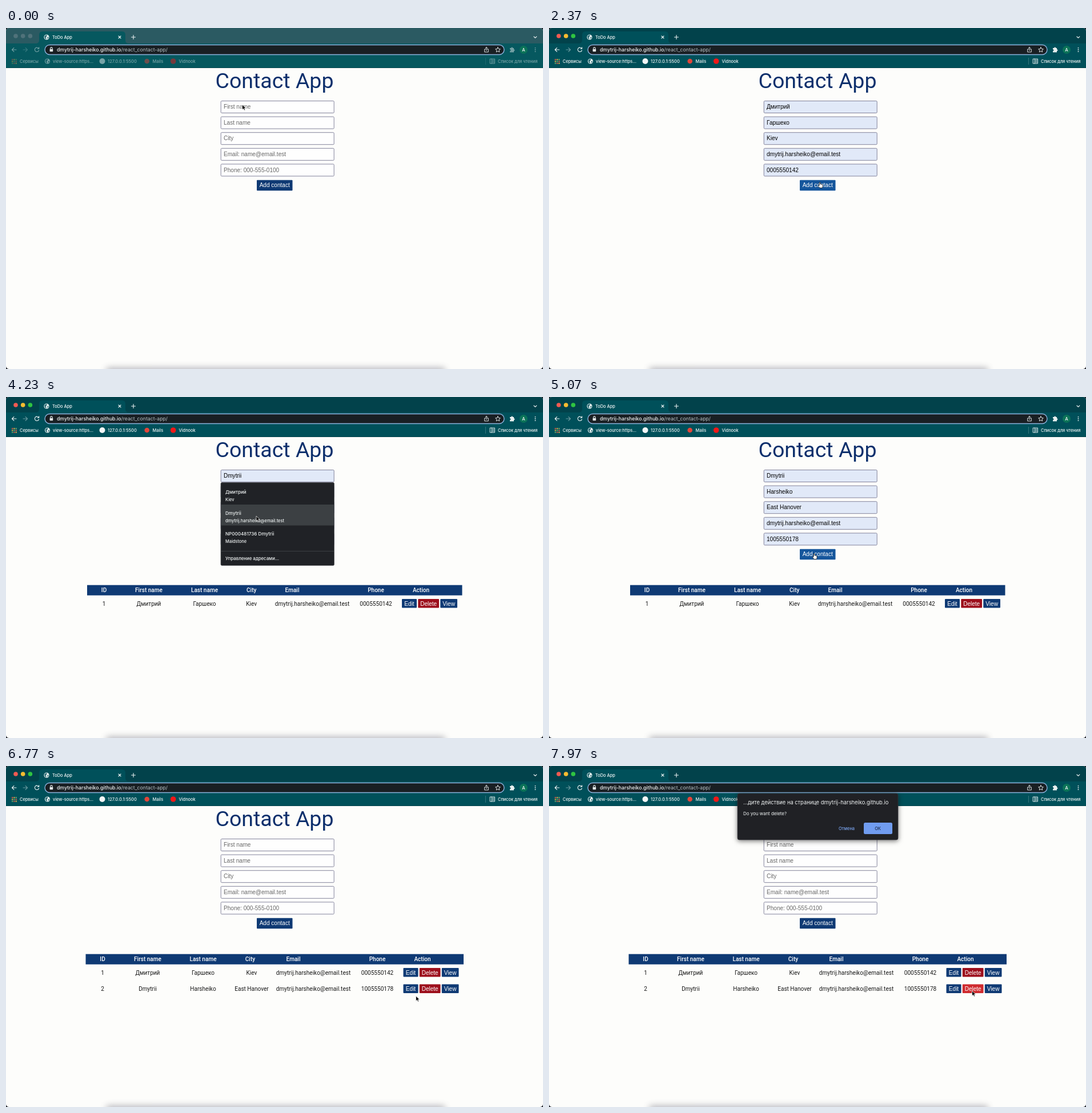
Animation, 940 px wide and 596 px high, one loop 8000 ms. Source, as an HTML page:

```html
<!DOCTYPE html>
<html lang="en">
<head>
<meta charset="utf-8">
<title>Contact App</title>
<style>
html, body { margin: 0; height: 100%; overflow: hidden; background: #10131c; }
svg { display: block; width: 100%; height: 100%; font: 10.05px "Liberation Sans", Arial, sans-serif; }
#stage { --strip: #02424b; --bar: #00505a; --dim: 1; }
#stage.idle { --strip: #2b5a62; --bar: #06585f; --dim: .48; }
.strip { fill: var(--strip); }
.bar { fill: var(--bar); }
.dim { opacity: var(--dim); }
.ui { font-family: Inter, sans-serif; font-size: 7.4px; font-weight: 500; fill: #f2f6f6; }
.line { fill: none; stroke: #eef4f4; stroke-width: 1.1; stroke-linecap: round; stroke-linejoin: round; }
.thin { stroke-width: .9; }
.idle .lights circle { fill: #50727a; }
.title { font: 37.5px Roboto, sans-serif; fill: #0d2f6c; }
.table { font-family: Roboto, sans-serif; fill: #181818; }
.head { font-weight: 500; fill: #fff; }
.field { fill: #fefefe; stroke: #83839c; }
.hint { fill: #686868; }
.filled .field { fill: #e1e9f8; }
.button { fill: #0f3a74; }
.button.hover { fill: #15569c; }
.delete { fill: #9d0f1c; }
.delete.hover { fill: #cf2b2f; }
.label { font-family: "Liberation Sans", Arial, sans-serif; fill: #fff; }
.mid { text-anchor: middle; }
.name { font-size: 8.1px; }
</style>
</head>
<body>
<svg id="stage" viewBox="0 0 940 596" preserveAspectRatio="none">
  <defs>
    <clipPath id="window"><rect width="940" height="596" rx="5"/></clipPath>
    <g id="globe">
      <circle r="4.6" fill="#e4eeee"/>
      <path d="M-3.6-1.8Q-1.5-4 .8-3.6L.2-1.2-1.6.2-.4 2-1.2 3.8Q-3.8 2.4-3.6-1.8M1.4.2 3.6-.6 3 2.2 1.6 3z" fill="#2b6b74"/>
    </g>
  </defs>
  <g clip-path="url(#window)">
    <rect width="940" height="596" fill="#fdfdfb"/>
    <rect x="176" y="594" width="592" height="12" fill="#555566" opacity=".45" style="filter:blur(6px)"/>

    <g id="page"></g>

    <g class="ui">
      <rect class="strip" width="940" height="28"/>
      <path class="bar" d="M0 27H52Q58 27 58 21V12Q58 6 64 6H203Q209 6 209 12V21Q209 27 215 27H940V70H0z"/>
      <path d="M0 69.5H940" stroke="#003840" stroke-opacity=".55"/>
      <g class="lights">
        <circle cx="17" cy="14" r="3.8" fill="#f35a52"/>
        <circle cx="29.7" cy="14" r="3.8" fill="#f6bc30"/>
        <circle cx="42.4" cy="14" r="3.8" fill="#2fc441"/>
      </g>
      <use href="#globe" x="71" y="16"/>
      <text x="81" y="18.6">ToDo App</text>
      <path class="line" d="M197 14l4 4m0-4l-4 4M219.5 16h7M223 12.5v7M924 15l2.4 2.4 2.4-2.4"/>

      <g class="dim">
        <path class="line" d="M18 38h-7.5m3.4-3.4L10.5 38l3.4 3.4M57.3 36a3.7 3.7 0 1 0 .3 3M57.7 33.8v2.5h-2.5"/>
        <path class="line" opacity=".45" d="M30 38h7.5m-3.4-3.4L37.5 38l-3.4 3.4"/>
        <path d="M882 35h2.2a1.5 1.5 0 0 1 3 0H889v2.2a1.5 1.5 0 0 1 0 3V42.5h-7v-2.3a1.5 1.5 0 0 0 0-3z" fill="#e8efef"/>
        <circle cx="926.5" cy="34.8" r=".9"/>
        <circle cx="926.5" cy="38" r=".9"/>
        <circle cx="926.5" cy="41.2" r=".9"/>
      </g>
      <rect x="68" y="29.5" width="804" height="17" rx="8.5" fill="#191f23" stroke="#8db2dc" stroke-width="1.4"/>
      <path class="line" d="M77.7 37v-1.4a1.7 1.7 0 0 1 3.4 0V37"/>
      <rect x="76.6" y="37" width="5.6" height="4.2" rx=".6" fill="#e4eaea"/>
      <text x="89" y="41.2" font-size="8.7" style="font-size:8.7px">dmytrij-harsheiko.github.io<tspan fill="#b9c4c8" font-weight="400">/react_contact-app/</tspan></text>
      <path class="line thin" d="M839.5 37h-1.8v5h6.6v-5h-1.8M841 39.5v-6m-1.7 1.7L841 33.5l1.7 1.7"/>
      <path class="line thin" d="M861 33.7l1.3 2.8 3 .4-2.2 2.1.6 3-2.7-1.5-2.7 1.5.6-3-2.2-2.1 3-.4z"/>
      <circle cx="906" cy="38" r="7" fill="#0b7358"/>
      <text class="mid" x="906" y="40.8" style="font-size:7.8px">A</text>

      <g class="dim">
        <g id="apps"></g>
        <text x="24" y="60.7">Сервисы</text>
        <use href="#globe" x="72.5" y="58"/>
        <text x="82" y="60.7">view-source:https…</text>
        <circle cx="168.5" cy="58" r="5" fill="#f3f6f6"/>
        <text x="178" y="60.7" style="font-size:7.6px">127.0.0.1:5500</text>
        <circle cx="246.7" cy="58" r="4.3" fill="#e2453a"/>
        <text x="256.5" y="60.7">Mails</text>
        <circle cx="292.7" cy="58" r="4.8" fill="#f01818"/>
        <text x="302.5" y="60.7">Vidnook</text>
        <path d="M839.5 52v12" stroke="#5d8f96" stroke-opacity=".6"/>
        <path class="line thin" d="M847.5 54h8v8h-8zM850 54v8M851.5 56h2.5m-2.5 2h2.5m-2.5 2h2.5"/>
        <text x="861" y="60.7">Список для чтения</text>
      </g>
    </g>

    <g data-on="960-1780 3680-4330" class="ui">
      <rect x="376" y="149.5" width="198.5" height="145" rx="2" fill="#202226" stroke="#55585c" stroke-width=".7"/>
      <rect id="option" x="376.4" width="197.7" height="36.5" fill="#3c4043"/>
      <g id="options"></g>
      <path d="M376 269.5h198" stroke="#3c4044"/>
      <text x="384" y="285" style="font-size:7.8px">Управление адресами…</text>
    </g>

    <g data-on="7720-8000" class="ui">
      <rect x="330" y="48" width="281" height="81" rx="3" fill="#202125" stroke="#3a3c40" stroke-width=".6" style="filter:drop-shadow(0 2px 4px #0008)"/>
      <text x="340" y="67.3" style="font-size:9.35px;font-weight:400">…дите действие на странице dmytrij-harsheiko.github.io</text>
      <text x="340" y="85.7" style="font-size:7.9px;font-weight:400">Do you want delete?</text>
      <text class="mid" x="521" y="111.5" fill="#7ba6f2">Отмена</text>
      <rect x="551" y="99" width="50" height="20" rx="2.5" fill="#709cf0"/>
      <text class="mid" x="575.5" y="111.5" fill="#1c2844">ОК</text>
    </g>

    <g id="cursor">
      <path id="arrow" d="M0 0v8.8l2.1-1.9 1.500 3.100 1.500-.7-1.400-3.100h2.800z" fill="#080808" stroke="#fff" stroke-width=".7"/>
      <path id="beam" d="M-1.900-4.600Q0-4.600 0-3.400 0-4.600 1.900-4.600M0-3.600V3.600M-1.900 4.600Q0 4.600 0 3.400 0 4.600 1.900 4.600" fill="none" stroke="#222" stroke-width=".9"/>
      <path id="hand" d="M-.9 0Q0-1 .9 0V3q1-.5 1.500.3 1-.4 1.500.4 1.100-.2 1.200 1V7q-.3 1.500-1.100 2.500H-.2Q-1.500 7.500-2.900 5.600-2.600 4.400-.9 5.400z" fill="#fff" stroke="#111" stroke-width=".8"/>
    </g>
  </g>
</svg>
<script>
const LOOP = 8000;
const $ = id => document.getElementById(id);
const email = "dmytrij.harsheiko@email.test";
const hints = ["First name", "Last name", "City", "Email: name@email.test", "Phone: 000-555-0100"];
const people = [
  ["Дмитрий", "Гаршеко", "Kiev", email, "0005550142"],
  ["Dmytrii", "Harsheiko", "East Hanover", email, "1005550178"],
];
const options = [["Дмитрий", "Kiev"], ["Dmytrii", email], ["NP000481736 Dmytrii", "Maidstone"]];

const text = (x, y, s, cls = "") => `<text x="${x}" y="${y}" class="${cls}">${s}</text>`;
const box = (x, y, w, h, cls, r = 1) => `<rect x="${x}" y="${y}" width="${w}" height="${h}" rx="${r}" class="${cls}"/>`;
const shown = (when, body, cls = "") => `<g data-on="${when}" class="${cls}">${body}</g>`;
const fieldTop = i => 127.5 + i * 27.6;

function form(values, cls) {
  return values.map((v, i) =>
    box(376.2, fieldTop(i), 198, 21, "field", 1.5) + text(381, fieldTop(i) + 13.6, v, cls)).join("");
}

function table(rows, left, width, centers, cityShift, buttonsX) {
  const heads = ["ID", "First name", "Last name", "City", "Email", "Phone", "Action"];
  let out = box(left, 328.7, width, 18, "button", 0);
  heads.forEach((h, i) => out += text(centers[i], 341.3, h, "mid head"));
  rows.forEach((person, r) => {
    const y = 364.5 + r * 28.4;
    [r + 1, ...person].forEach((v, i) => {
      const shift = i === 3 ? cityShift : i === 4 ? 35 : 0;
      out += text(centers[i] + shift, y, v, "mid");
    });
    [["Edit", 0, 26], ["Delete", 28.3, 36.7], ["View", 67.3, 29.7]].forEach(([name, dx, w]) => {
      const cls = name === "Delete" ? `delete row${r}` : "button";
      out += box(buttonsX + dx, y - 11.4, w, 15.5, cls) + text(buttonsX + dx + w / 2, y, name, "mid label");
    });
  });
  return out;
}

$("page").innerHTML =
  text(470, 104.8, "Contact App", "title mid") +
  shown("0-1500 2620-4080 5300-8000", form(hints, "hint")) +
  shown("1500-2620", form(people[0]), "filled") +
  shown("4080-5300", form(people[1]), "filled") +
  shown("960-1500 3680-4080", `<path d="M381.5 133v10" stroke="#111" stroke-width=".8"/>`) +
  `<rect id="add" class="button" x="439" y="265.7" width="62.5" height="18.5" rx="1"/>` +
  text(470.2, 278.2, "Add contact", "mid label") +
  shown("2620-5300", table(people.slice(0, 1), 142, 656.5, [171.5, 250, 347.5, 429.7, 501, 647.5, 726.5], 0, 693), "table") +
  shown("5300-8000", table(people, 139.5, 661.5, [169, 248, 345, 427.5, 503, 650, 729], 2.5, 695.5), "table");

$("options").innerHTML = options.map(([name, sub], i) =>
  text(384, 169 + i * 36.5, name, "name") + text(384, 182 + i * 36.5, sub)).join("");

const tints = ["#c2574e", "#c9a047", "#5aa06a"];
$("apps").innerHTML = Array.from({length: 9}, (_, i) => {
  const col = i % 3, row = Math.floor(i / 3);
  return `<rect x="${10 + col * 3.3}" y="${54 + row * 3.3}" width="2.3" height="2.3" fill="${tints[(col + row) % 3]}"/>`;
}).join("");

// Pointer stops: time, x, y
const stops = [
  [0, 413.5, 134], [350, 413.5, 134], [800, 426, 140], [1270, 426, 140], [1600, 430, 174],
  [1800, 430, 174], [2300, 474, 270], [2700, 474, 270], [3300, 458.5, 132], [3420, 458.5, 132],
  [3650, 446, 137], [3800, 446, 137], [4150, 438, 208], [4350, 438, 208], [4950, 464, 274],
  [5400, 464, 274], [6500, 717.5, 402], [6950, 717.5, 402], [7450, 740.5, 393], [LOOP, 740.5, 393],
];

function pointer(t) {
  const i = stops.findIndex(s => s[0] > t);
  const [t0, x0, y0] = stops[i - 1], [t1, x1, y1] = stops[i];
  const k = (t - t0) / (t1 - t0), e = k * k * (3 - 2 * k);
  return [x0 + (x1 - x0) * e, y0 + (y1 - y0) * e];
}

const timed = [...document.querySelectorAll("[data-on]")].map(el =>
  [el, el.dataset.on.split(" ").map(span => span.split("-").map(Number))]);
const within = (t, spans) => spans.some(([a, b]) => t >= a && t < b);
const show = (el, on) => el.setAttribute("visibility", on ? "inherit" : "hidden");
const lowerDelete = document.querySelector(".row1");
const upperDelete = document.querySelectorAll(".row0")[1];

function draw(t) {
  timed.forEach(([el, spans]) => show(el, within(t, spans)));
  const idle = t < 720, dialog = t >= 7720;
  const menu = within(t, [[960, 1780], [3680, 4330]]);
  const [x, y] = pointer(t);
  $("stage").classList.toggle("idle", idle);
  $("cursor").setAttribute("transform", `translate(${x.toFixed(2)} ${y.toFixed(2)})`);

  const row = Math.floor((y - 151.5) / 36.5);
  show($("option"), menu && row >= 0 && row < 3);
  $("option").setAttribute("y", 151.5 + Math.max(row, 0) * 36.5);

  const onAdd = x > 439 && x < 501.5 && y > 265.7 && y < 284.2;
  const overDelete = top => t >= 5300 && x > 723.8 && x < 760.5 && y > top && y < top + 15.5;
  const onLower = overDelete(381.5), onUpper = overDelete(353.1);
  $("add").classList.toggle("hover", onAdd);
  lowerDelete.classList.toggle("hover", onLower);
  upperDelete.classList.toggle("hover", onUpper);

  const inField = x > 376 && x < 575 && hints.some((_, i) => y > fieldTop(i) && y < fieldTop(i) + 21);
  const hand = !dialog && (onAdd || onLower || onUpper);
  const beam = !idle && inField && !(menu && y > 149);
  show($("hand"), hand);
  show($("beam"), beam);
  show($("arrow"), !hand && !beam);
}

const start = performance.now();
function tick() {
  draw((performance.now() - start) % LOOP);
  requestAnimationFrame(tick);
}
draw(0);
requestAnimationFrame(tick);
</script>
</body>
</html>
```
